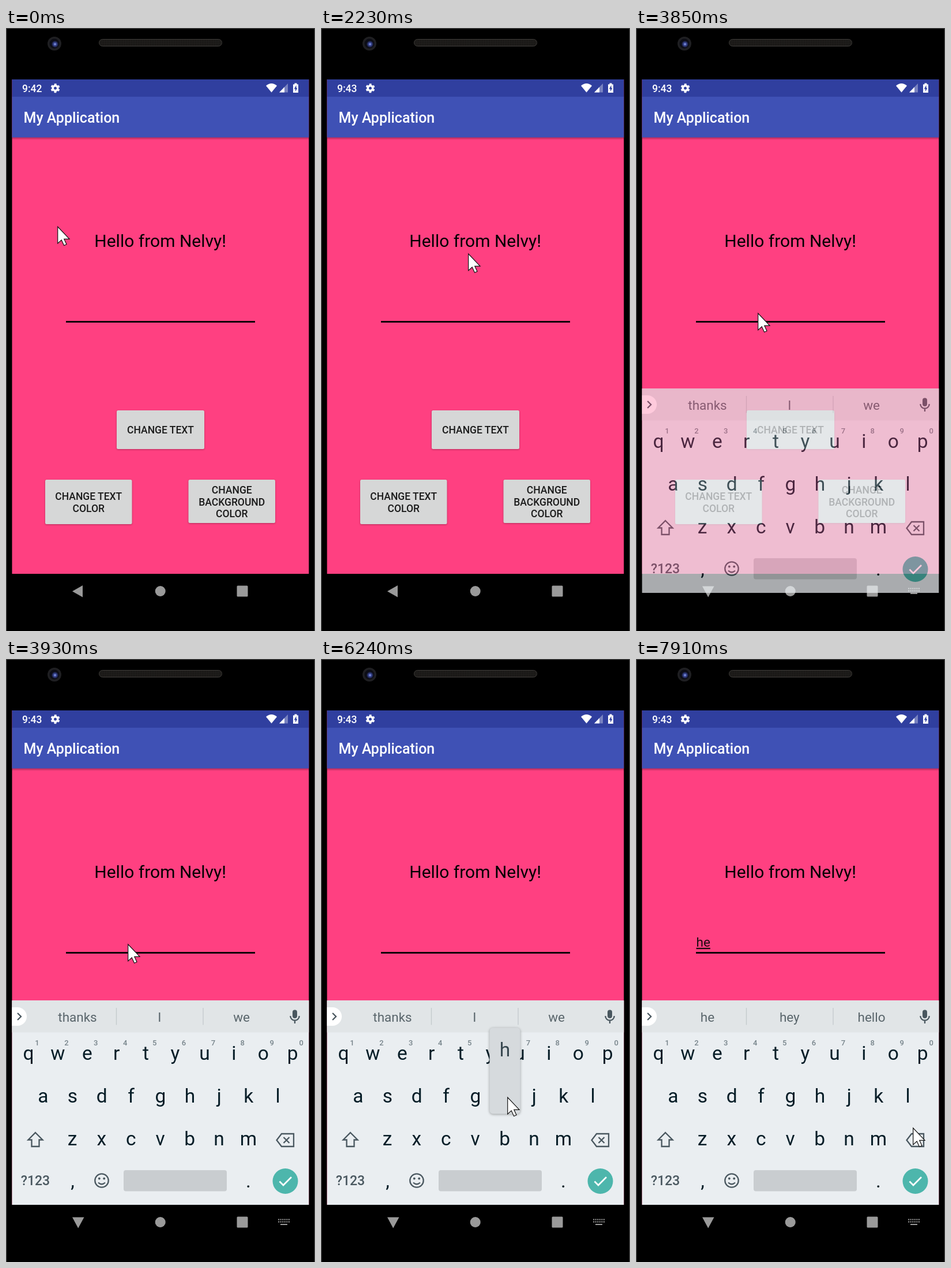
These frames come from a looping animation (536x1044 px, 8 s). An HTML page:

```html
<!DOCTYPE html>
<html lang="en">
<head>
<meta charset="utf-8">
<title>Phone demo</title>
<style>
  html, body { margin: 0; width: 100%; height: 100%; overflow: hidden; background: #000; }
  svg { display: block; width: 536px; height: 1044px; font-family: Roboto, sans-serif; }
  .mid { text-anchor: middle; }
  .medium { font-weight: 500; }
  .button { fill: #d6d7d7; filter: drop-shadow(0 1.5px 1.5px rgba(0, 0, 0, .3)); }
  .label { font-size: 17.5px; fill: #1b1b1b; }
  .key { font-size: 33.5px; fill: #061d27; }
  .hint { font-size: 13px; fill: #76838a; }
  .word { font-size: 22.5px; fill: #59656b; }
  .icon { fill: none; stroke: #49575f; stroke-width: 2.3; }
</style>
</head>
<body>
<svg viewBox="0 0 536 1044">
  <defs>
    <linearGradient id="shade" x2="0" y2="1">
      <stop stop-opacity=".3"/><stop offset="1" stop-opacity="0"/>
    </linearGradient>
    <radialGradient id="lens">
      <stop stop-color="#9fb0f2"/><stop offset=".4" stop-color="#3c4a9c"/><stop offset="1" stop-color="#0e1020"/>
    </radialGradient>
    <pattern id="mesh" width="3" height="3" patternUnits="userSpaceOnUse">
      <rect width="3" height="3" fill="#22201e"/><circle cx="1.5" cy="1.5" r=".9" fill="#0f0e0d"/>
    </pattern>
  </defs>

  <rect width="536" height="1044"/>
  <path d="M.5 1044V.5H535.5V1044" fill="none" stroke="#4a4a4a" stroke-width="1.5"/>
  <circle cx="84" cy="27" r="12" fill="#1f1f22"/>
  <circle cx="84" cy="27" r="8.500" fill="#0c0d15"/>
  <circle cx="85" cy="28" r="6" fill="url(#lens)"/>
  <rect x="161.5" y="19.5" width="213" height="12" rx="6" fill="url(#mesh)" stroke="#3c3a37"/>

  <path d="M10.500 89H525.300V945H10.500Z" fill="#ff4081"/>
  <path d="M10.500 89H525.300V119.500H10.500Z" fill="#303f9f"/>
  <path d="M10.500 119H525.300V189.500H10.500Z" fill="#3f51b5"/>
  <path d="M10.500 189.500H525.300V194H10.500Z" fill="url(#shade)"/>

  <g fill="#fff">
    <text id="clock" class="medium" x="28" y="111" font-size="17.5"></text>
    <g transform="translate(85.5 104.200) rotate(14.200)" fill="none" stroke="#fff">
      <circle r="4.3" stroke-width="3.6"/>
      <circle r="6.7" stroke-width="2.6" stroke-dasharray="3.7 3.317"/>
    </g>
    <path d="M460.500 111.500L451 100Q460.500 92 470 100Z"/>
    <path d="M489 96V111.500H474Z" opacity=".35"/>
    <path d="M483 102.200V111.500H474Z"/>
    <path d="M500.500 97.500V95.500H504.500V97.500H507V112H498V97.500Z"/>
    <path d="M503.500 99L499.800 105.500H502V110L505.400 103.800H503.500Z" fill="#303f9f"/>
    <text class="medium" x="30.500" y="164" font-size="25">My Application</text>
  </g>

  <text x="153.300" y="379" font-size="30">Hello from Nelvy!</text>
  <text id="typed" x="104.500" y="498" font-size="22.5" fill="#1b0b10" text-decoration="underline"></text>
  <path d="M104 507.300H432V510H104Z"/>
  <g id="buttons"></g>

  <g fill="#9a9a9a">
    <path id="back"/>
    <circle cx="267.700" cy="975" r="9"/>
    <rect x="400.500" y="965.500" width="19" height="19" rx="1.500"/>
    <g id="switcher" stroke="#9a9a9a" stroke-width="2">
      <path d="M472 970.500H492M472 974.500H492" stroke-dasharray="2.2 1.36"/>
      <path d="M476 979H488"/>
    </g>
  </g>

  <g id="keyboard">
    <path d="M10.500 591.300H525.300V945H10.500Z" fill="#eaeef1"/>
    <path d="M10.500 591.300H525.300V646.500H10.500Z" fill="#e1e5e7"/>
    <path d="M10.500 603H20A16 16 0 0 1 20 635H10.500Z" fill="#fff"/>
    <path d="M20 613L26 619L20 625" class="icon"/>
    <path d="M191.500 604V633.500M342 604V633.500" stroke="#c3c9cc" stroke-width="1.3"/>
    <g id="words"></g>
    <rect x="497" y="607.500" width="8" height="14.500" rx="4" fill="#49575f"/>
    <path d="M493.300 618A7.700 7.700 0 0 0 508.700 618M501 626V631" class="icon"/>
    <g id="keys"></g>
    <path d="M51 820L63.500 832.500H57.500V844H44.500V832.500H38.500Z" class="icon"/>
    <path d="M478 822H499V844H478L469.500 833ZM481.500 828L491.500 838M491.500 828L481.500 838" class="icon"/>
    <text class="mid medium" x="51" y="911" font-size="23" fill="#49575f">?123</text>
    <circle cx="166" cy="903" r="11.700" class="icon"/>
    <path d="M160 906.500Q166 912 172 906.500" class="icon"/>
    <circle cx="161.800" cy="899.500" r="1.900" fill="#49575f"/>
    <circle cx="170.200" cy="899.500" r="1.900" fill="#49575f"/>
    <rect x="204" y="885" width="179" height="36.500" rx="4" fill="#c9cdd0"/>
    <circle cx="484.500" cy="904" r="22" fill="#4db6ac"/>
    <path d="M474.500 904.500L481 911L495 897" fill="none" stroke="#fff" stroke-width="2.700"/>
    <g id="popup">
      <rect x="-26.500" y="-129.500" width="53" height="149" rx="6" fill="#d6dadd" style="filter: drop-shadow(0 1px 2px rgba(0, 0, 0, .35))"/>
      <text id="popupText" class="mid" y="-80.500" font-size="33.5" fill="#37474f"></text>
    </g>
  </g>

  <path id="pointer" d="M.7 1V30L7.200 24L11.600 33.500L16 31.500L11.800 22.300H21Z" fill="#fff" stroke="#111" stroke-width="1.200"/>
</svg>
<script>
const $ = id => document.getElementById(id);
const text = (cls, x, y, s) => `<text class="${cls}" x="${x}" y="${y}">${s}</text>`;
const show = (id, visible) => { $(id).style.display = visible ? '' : 'none'; };

// x, y, width, height, first baseline, lines
$('buttons').innerHTML = [
  [192, 662, 152, 67, 702.3, ['CHANGE TEXT']],
  [68, 782, 150.5, 77, 817.3, ['CHANGE TEXT', 'COLOR']],
  [316.5, 782, 150.5, 75, 806, ['CHANGE', 'BACKGROUND', 'COLOR']],
].map(([x, y, w, h, base, lines]) =>
  `<rect class="button" x="${x}" y="${y}" width="${w}" height="${h}" rx="2.5"/>` +
  lines.map((s, i) => text('mid medium label', x + w / 2, base + i * 20.5, s)).join('')
).join('');

const STEP = 50.9;
const row = (letters, x, y) =>
  [...letters].map((c, i) => text('mid key', x + i * STEP, y, c)).join('');
$('keys').innerHTML =
  row('qwertyuiop', 39, 694) + row('asdfghjkl', 64.4, 768) + row('zxcvbnm', 115, 841.8) +
  [...'1234567890'].map((c, i) => text('mid medium hint', 54 + i * STEP, 669, c)).join('') +
  text('mid key', 115.5, 914.5, ',') + text('mid key', 420.5, 914.5, '.');

// Pointer moves: start, end, steps, target x, target y
const start = [89, 343];
const moves = [
  [90, 360, 4, 151, 321], [540, 720, 3, 215, 374], [1460, 1640, 3, 252, 386],
  [2230, 2230, 1, 255, 390], [2320, 2770, 6, 214, 509], [2860, 2950, 2, 211, 493],
  [4670, 4820, 3, 211, 537], [5120, 5120, 1, 211, 582], [5200, 5540, 5, 323, 778],
  [5690, 5930, 4, 323, 758], [6420, 6970, 8, 146, 694], [7680, 7910, 4, 480, 811],
];

function pointerAt(t) {
  let [x, y] = start;
  for (const [from, to, steps, tx, ty] of moves) {
    if (t < from) break;
    const done = steps === 1 ? 1
      : Math.min(steps, Math.floor((t - from) / (to - from) * (steps - 1) + 1.001));
    const p = done / steps, e = p * p * (3 - 2 * p);
    x += (tx - x) * e;
    y += (ty - y) * e;
  }
  return `translate(${x} ${y})`;
}

const suggestions = t =>
  t < 6420 ? ['thanks', 'I', 'we'] : t < 7530 ? ['h', 'he', 'hi'] : ['he', 'hey', 'hello'];

let shownWords;
function draw(t) {
  $('clock').textContent = t < 540 ? '9:42' : '9:43';
  $('typed').textContent = t < 6420 ? '' : t < 7460 ? 'h' : 'he';

  const open = t >= 3760;
  $('back').setAttribute('d', open ? 'M115 966.500H135.500L125.200 985.500Z' : 'M133 965V985.500L115 975.200Z');
  show('switcher', open);

  const sliding = t < 3930;
  show('keyboard', t >= 3850);
  $('keyboard').setAttribute('opacity', sliding ? .72 : 1);
  $('keyboard').setAttribute('transform', `translate(0 ${sliding ? 33 : 0})`);

  const words = suggestions(t);
  if (words.join() !== shownWords) {
    shownWords = words.join();
    $('words').innerHTML = words.map((s, i) => text('mid word', 124 + i * 142.3, 628, s)).join('');
  }

  const pressed = t >= 6240 && t < 6420 ? ['h', 319, 768]
    : t >= 7380 && t < 7460 ? ['e', 140.5, 694] : null;
  show('popup', pressed);
  if (pressed) {
    const [letter, x, y] = pressed;
    $('popupText').textContent = letter;
    $('popup').setAttribute('transform', `translate(${x} ${y})`);
  }

  $('pointer').setAttribute('transform', pointerAt(t));
}

const began = performance.now();
function tick() {
  draw((performance.now() - began) % 8000);
  requestAnimationFrame(tick);
}
tick();
</script>
</body>
</html>
```
